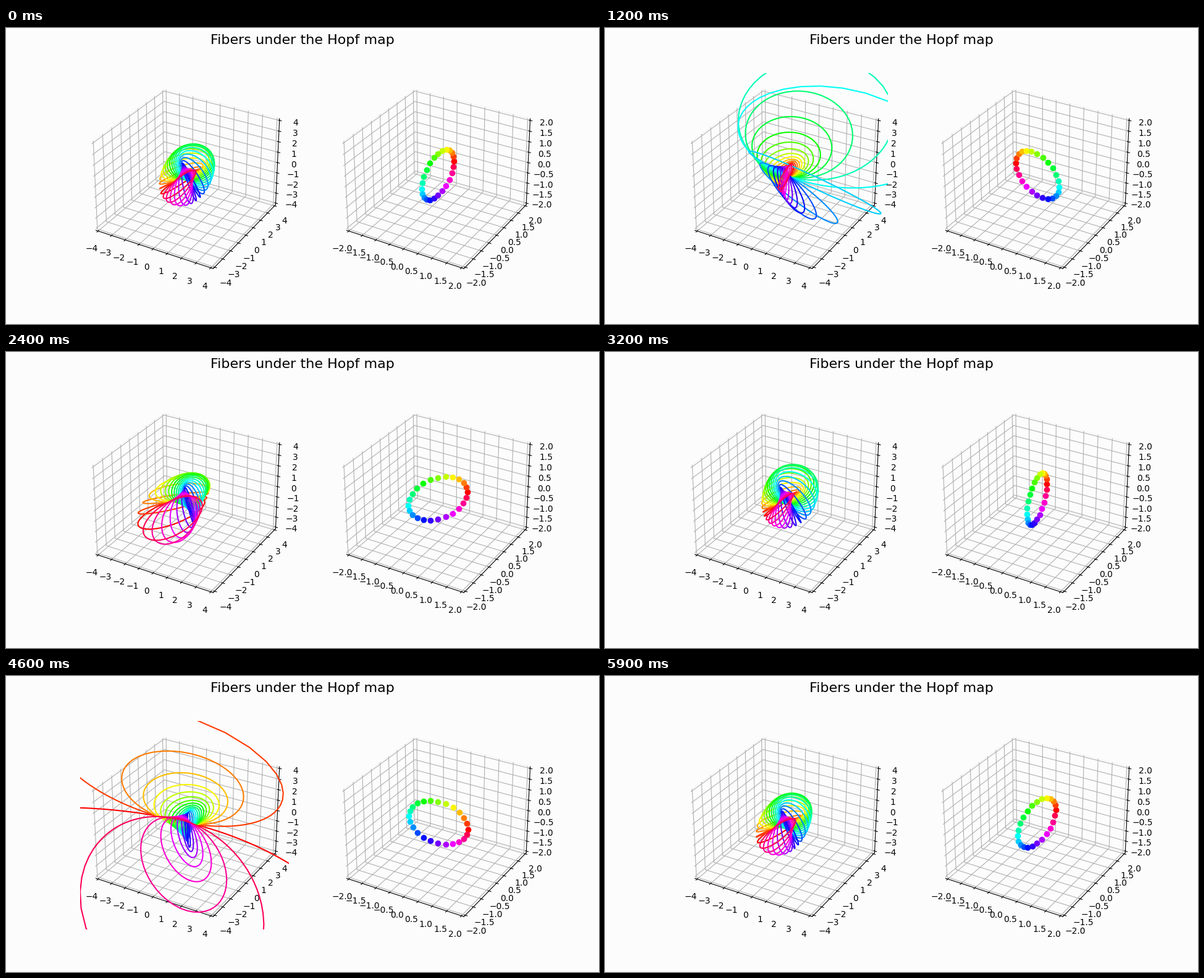
A matplotlib script that plays this animation: 960 px wide and 480 px high, repeating every 6 s.

```python
import numpy as np
import matplotlib.pyplot as plt
from matplotlib.animation import FuncAnimation

FRAMES = 60
FIBERS = 24
BG = "#fcfcfc"

plt.rcParams["font.family"] = "DejaVu Sans"
plt.rcParams["axes3d.automargin"] = True

fig = plt.figure(figsize=(9.6, 4.8), dpi=100, facecolor=BG)
fig.suptitle("Fibers under the Hopf map", fontsize=16)


def make_axes(pos, ticks):
    ax = fig.add_subplot(1, 2, pos, projection="3d", facecolor=BG)
    ax.set(xlim=ticks[[0, -1]], ylim=ticks[[0, -1]], zlim=ticks[[0, -1]])
    ax.set(xticks=ticks, yticks=ticks, zticks=ticks)
    for axis in (ax.xaxis, ax.yaxis, ax.zaxis):
        axis.pane.set_facecolor(BG)
        axis.pane.set_edgecolor("#f0f0f0")
    return ax


space = make_axes(1, np.arange(-4, 5))
sphere = make_axes(2, np.arange(-2, 2.5, 0.5))

angles = 2 * np.pi * np.arange(FIBERS) / FIBERS
colors = [plt.cm.hsv(i / FIBERS) for i in range(FIBERS)]
loops = [space.plot([], [], [], color=c)[0] for c in colors]
dots = [sphere.plot([], [], [], "o", color=c)[0] for c in colors]

t = np.linspace(-np.pi, np.pi, 300)


def fiber(p):
    """Stereographic image of the circle in S3 lying over the point p of S2."""
    r0 = np.sqrt(max(1 + p[0], 0) / 2)
    r1 = np.sqrt(max(1 - p[0], 0) / 2)
    phase = t + np.arctan2(p[2], -p[1])
    scale = 1 / (1 - r0 * np.cos(t))
    return (-r0 * np.sin(t) * scale,
            r1 * np.cos(phase) * scale,
            r1 * np.sin(phase) * scale)


def update(frame):
    # The meridian circle turns 6 degrees per step and flips back after 180.
    turn = np.radians((90 + 6 * frame) % 180)
    for a, loop, dot in zip(angles, loops, dots):
        p = (np.cos(a) * np.cos(turn), np.cos(a) * np.sin(turn), np.sin(a))
        loop.set_data_3d(*fiber(p))
        dot.set_data_3d(*([v] for v in p))
    return loops + dots


anim = FuncAnimation(fig, update, frames=FRAMES, interval=100,
                     init_func=lambda: update(0), repeat=True)
plt.show()
```
